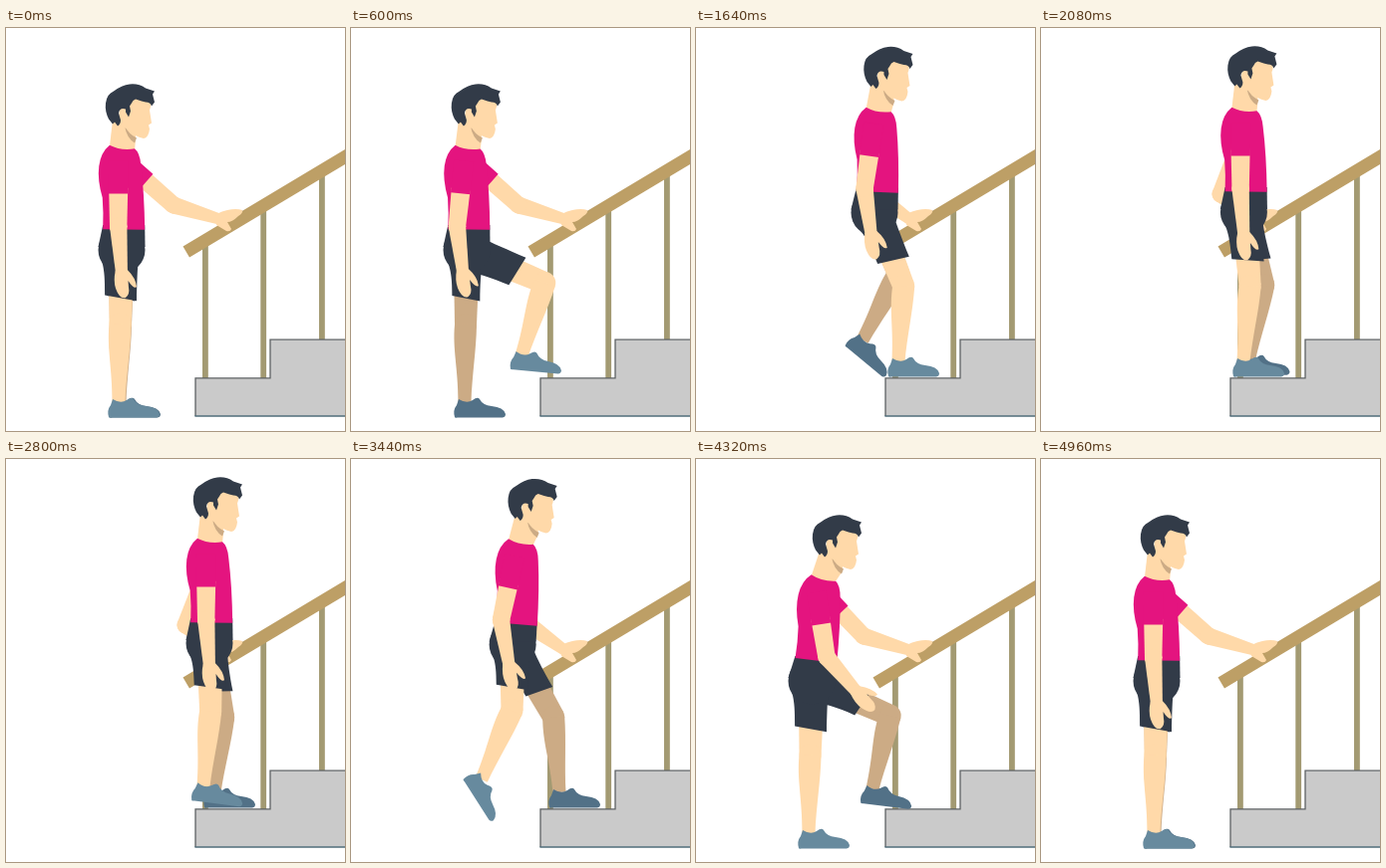
An HTML page with a canvas for the animation above (5.84 s loop, 340 by 405 pixels).

```html
<!DOCTYPE html>
<html lang="en">
<head>
<meta charset="utf-8">
<title>Stair exercise</title>
<style>
  html, body { margin: 0; width: 100%; height: 100%; overflow: hidden; background: #fff; }
  canvas { display: block; width: 340px; height: 405px; }
</style>
</head>
<body>
<canvas id="stage"></canvas>
<script>
const W = 340, H = 405, LOOP = 5840, TICK = 40;
const canvas = document.getElementById('stage');
const ctx = canvas.getContext('2d');
const dpr = window.devicePixelRatio || 1;
canvas.width = W * dpr;
canvas.height = H * dpr;

const SKIN = '#ffd9a9', SHADE = '#ccab85', PINK = '#e4147f', DARK = '#323b48';
const SHOE = '#678a9e', FAR_SHOE = '#527187';
const RAIL = '#bd9f66', POST = '#a39a72', STONE = '#cacaca';
const SHIN = 76, UPPER_ARM = 66, FOREARM = 46;

const shapes = {
  hair: 'M12 42L9 38L7 40L3 35Q-1 27 0 19Q1 10 8 7Q16 1 24 0Q33-1 40 4L49 7L47 10L49 18L46 22Q45 18 40 18L36 17L30 15Q27 16 26 19L24 22L25 27L23 33L20 28L20 25Q14 23 13 29L15 36Q15 40 12 42Z',
  face: 'M14 26L25 13L45 14Q46 22 44 26L46 39L43 41L44 45Q43 54 38 54.5Q29 53 22 45L12 41Z',
  neckShade: 'M19 42Q23 50 31 54L29 59Q21 54 19 42Z',
  torso: 'M-13-3Q-2 3 12 1Q17 5 18 17Q21 45 21 83L-21 82Q-20 65-21 50Q-26 32-24 18Q-22 4-13-3Z',
  shoe: 'M-10 15Q-12 8-8 3L-6-3Q2 2 8-2Q13-6 15-3Q18 3 27 4Q39 5 41 12Q41 15 38 15.5L-7 15.5Q-10 16-10 15Z',
  hand: 'M-6-2Q-9 8-7 16Q-4 27 2 26Q7 23 6 15L6 9Q11 18 14 16Q14 7 6-2Z',
  gripHand: 'M211 187Q217 184 222 183Q231 181 237 183Q238 186 233 189Q227 195 222 195L226 202Q225 205 221 204L211 198Z',
  shin: 'M-11 0C-13 25-7 42-6.5 76L6.5 76C7 50 11 25 11 0Z'
};
for (const name in shapes) shapes[name] = new Path2D(shapes[name]);

// Timing helpers: progress, eased progress, and a rise and fall between two times.
const part = (t, from, to) => Math.min(1, Math.max(0, (t - from) / (to - from)));
const glide = (t, from, to) => { const u = part(t, from, to); return u * u * (3 - 2 * u); };
const arc = (t, from, to) => Math.sin(Math.PI * part(t, from, to));
const pulse = (t, from, to) => arc(t, from, to) ** 2;

function nearFoot(t) {
  const step = glide(t, 0, 1000);
  return {
    pos: [113 + 90 * (step - glide(t, 2640, 3760)),
          376 - 41 * (step - glide(t, 3300, 4050)) - 22 * arc(t, 0, 1000) - 17 * arc(t, 2640, 4050)],
    tilt: 6 * pulse(t, 0, 1000) + 60 * pulse(t, 2640, 4050)
  };
}

function farFoot(t) {
  return {
    pos: [114 + 95 * (glide(t, 1080, 2120) - glide(t, 3950, 4900)),
          376 - 41 * (glide(t, 1000, 2100) - glide(t, 4250, 4880)) - 38 * arc(t, 1000, 2100) - 5 * arc(t, 3950, 4880)],
    tilt: 48 * pulse(t, 800, 2120) + 8 * pulse(t, 3950, 4880)
  };
}

function body(t) {
  const rise = glide(t, 750, 1700) - glide(t, 3350, 4080);
  const lean = 1 + 12 * pulse(t, 500, 1900) + 16 * pulse(t, 2950, 4960);
  const hip = [116 + 88 * (glide(t, 700, 2150) - glide(t, 2840, 4080)), 223 - 38 * rise];
  return {
    hip, lean,
    neck: [hip[0] + lean, hip[1] - 102.5],
    waist: [hip[0] + 2 + 0.2 * lean, hip[1] - 21],
    farElbow: [168 + 12 * rise, 178 - 11 * rise]
  };
}

// Degrees forward from hanging straight down.
function nearArmAngles(t) {
  const climb = pulse(t, 300, 2000), descend = pulse(t, 2850, 4000), reach = pulse(t, 3800, 4900);
  return [-21 * climb - 12 * descend + 9 * reach, 4 + 11 * climb + 6 * descend + 37 * reach];
}

// Two-bone knee: the thigh looks longer in front of the body and shorter behind it.
function kneeOf(hip, ankle) {
  const dx = ankle[0] - hip[0], dy = ankle[1] - hip[1], d = Math.hypot(dx, dy);
  const thigh = 75 + (dx > 0 ? 0.18 * dx : Math.max(-9, 1.1 * dx));
  const along = (thigh * thigh - SHIN * SHIN + d * d) / (2 * d);
  const out = Math.sqrt(Math.max(0, thigh * thigh - along * along));
  return [hip[0] + (dx * along + dy * out) / d, hip[1] + (dy * along - dx * out) / d];
}

const rad = deg => deg * Math.PI / 180;
const dist = (a, b) => Math.hypot(b[0] - a[0], b[1] - a[1]);
const swing = ([x, y], deg, len) => [x + Math.sin(rad(deg)) * len, y + Math.cos(rad(deg)) * len];
const boneAngle = (a, b) => Math.atan2(b[1] - a[1], b[0] - a[0]) - Math.PI / 2;
const mix = (a, b, k) => [a[0] + (b[0] - a[0]) * k, a[1] + (b[1] - a[1]) * k];

function place([x, y], angle, draw) {
  ctx.save();
  ctx.translate(x, y);
  ctx.rotate(angle);
  draw();
  ctx.restore();
}

function fill(color, path) {
  ctx.fillStyle = color;
  ctx.fill(path);
}

function poly(color, points) {
  ctx.fillStyle = color;
  ctx.beginPath();
  points.forEach(p => ctx.lineTo(p[0], p[1]));
  ctx.fill();
}

function disc(color, [x, y], r) {
  ctx.fillStyle = color;
  ctx.beginPath();
  ctx.arc(x, y, r, 0, 7);
  ctx.fill();
}

// Tapered bar from a to b, with optional round ends.
function limb(color, a, b, ra, rb, round = true) {
  const len = dist(a, b);
  place(a, boneAngle(a, b), () => poly(color, [[-ra, 0], [-rb, len], [rb, len], [ra, 0]]));
  if (round) {
    disc(color, a, ra);
    disc(color, b, rb);
  }
}

function drawStairs() {
  for (const [x, top, bottom] of [[197, 216, 352], [255.3, 180, 352], [314, 144, 313]]) {
    ctx.fillStyle = POST;
    ctx.fillRect(x, top, 5.8, bottom - top);
  }
  poly(RAIL, [[177.5, 219.5], [340, 122], [340, 137], [184, 230.5]]);
  poly(STONE, [[190, 352], [265, 352], [265, 313.5], [340, 313.5], [340, 390], [190, 390]]);
  ctx.lineWidth = 1.3;
  ctx.strokeStyle = '#5e6264';
  ctx.stroke(new Path2D('M190 390V351.8H265V313.2H340'));
  ctx.strokeStyle = '#4f6c7a';
  ctx.stroke(new Path2D('M189.4 390H340'));
}

function drawLeg(hip, foot, skin, shoe, hem) {
  const ankle = foot.pos, knee = kneeOf(hip, ankle);
  const cut = 0.65 * dist(hip, knee);
  limb(skin, mix(hip, knee, 0.55), knee, 12, 11);
  place(knee, boneAngle(knee, ankle), () => {
    ctx.scale(1, dist(knee, ankle) / SHIN);
    fill(skin, shapes.shin);
  });
  place(ankle, rad(foot.tilt), () => fill(shoe, shapes.shoe));
  place(hip, boneAngle(hip, knee), () => fill(DARK, new Path2D(
    `M-23 0C-20 14 ${-hem} 14 ${-hem} ${cut - 2.5}L${hem} ${cut + 2.5}C${hem} 14 17 14 17 0Z`)));
}

function drawPelvis(hip, waist) {
  disc(DARK, hip, 23.5);
  poly(DARK, [[waist[0] - 21, waist[1] - 4], [waist[0] + 21, waist[1] - 4],
    [hip[0] + 23.5, hip[1] - 3], [hip[0] - 23.5, hip[1] - 3]]);
}

function drawTorso(neck, waist) {
  place(neck, boneAngle(neck, waist), () => {
    ctx.scale(1, dist(neck, waist) / 82);
    fill(PINK, shapes.torso);
  });
}

function drawHead(neck, lean) {
  const x = neck[0] - 17.5 + 0.5 * lean, y = neck[1] - 64;
  poly(SKIN, [[x + 7, y + 36], [x + 30, y + 48], [x + 30, y + 56],
    [neck[0] + 12, neck[1] + 2], [neck[0], neck[1] + 4], [neck[0] - 13, neck[1] - 2]]);
  place([x, y], 0, () => {
    fill(SHADE, shapes.neckShade);
    fill(SKIN, shapes.face);
    fill(DARK, shapes.hair);
  });
}

function drawFarArm(neck, lean, elbow) {
  const shoulder = [neck[0] + 3 - 0.3 * lean, neck[1] + 15];
  limb(SKIN, shoulder, elbow, 9, 8.5);
  limb(SKIN, elbow, [214, 192], 8.5, 5.5);
  fill(SKIN, shapes.gripHand);
  limb(PINK, shoulder, mix(shoulder, elbow, 0.44), 10, 9.8, false);
}

function drawNearArm(neck, lean, [upper, fore]) {
  const shoulder = [neck[0] - 4 - 0.3 * lean, neck[1] + 13];
  const elbow = swing(shoulder, upper, UPPER_ARM), wrist = swing(elbow, fore, FOREARM);
  limb(SKIN, swing(shoulder, upper, 28), elbow, 9.5, 8.7);
  limb(SKIN, elbow, wrist, 8.7, 6);
  place(wrist, -rad(fore), () => fill(SKIN, shapes.hand));
  limb(PINK, shoulder, swing(shoulder, upper, 33), 10, 9.8, false);
}

function drawFigure(t) {
  const { hip, lean, neck, waist, farElbow } = body(t);
  drawFarArm(neck, lean, farElbow);
  drawLeg(hip, farFoot(t), SHADE, FAR_SHOE, 14);
  drawLeg(hip, nearFoot(t), SKIN, SHOE, 16);
  drawPelvis(hip, waist);
  drawHead(neck, lean);
  drawTorso(neck, waist);
  drawNearArm(neck, lean, nearArmAngles(t));
}

const start = performance.now();
function loop() {
  const now = (performance.now() - start) % LOOP;
  ctx.setTransform(dpr, 0, 0, dpr, 0, 0);
  ctx.fillStyle = '#fff';
  ctx.fillRect(0, 0, W, H);
  drawStairs();
  drawFigure(Math.floor(now / TICK) * TICK);
  requestAnimationFrame(loop);
}
loop();
</script>
</body>
</html>
```
